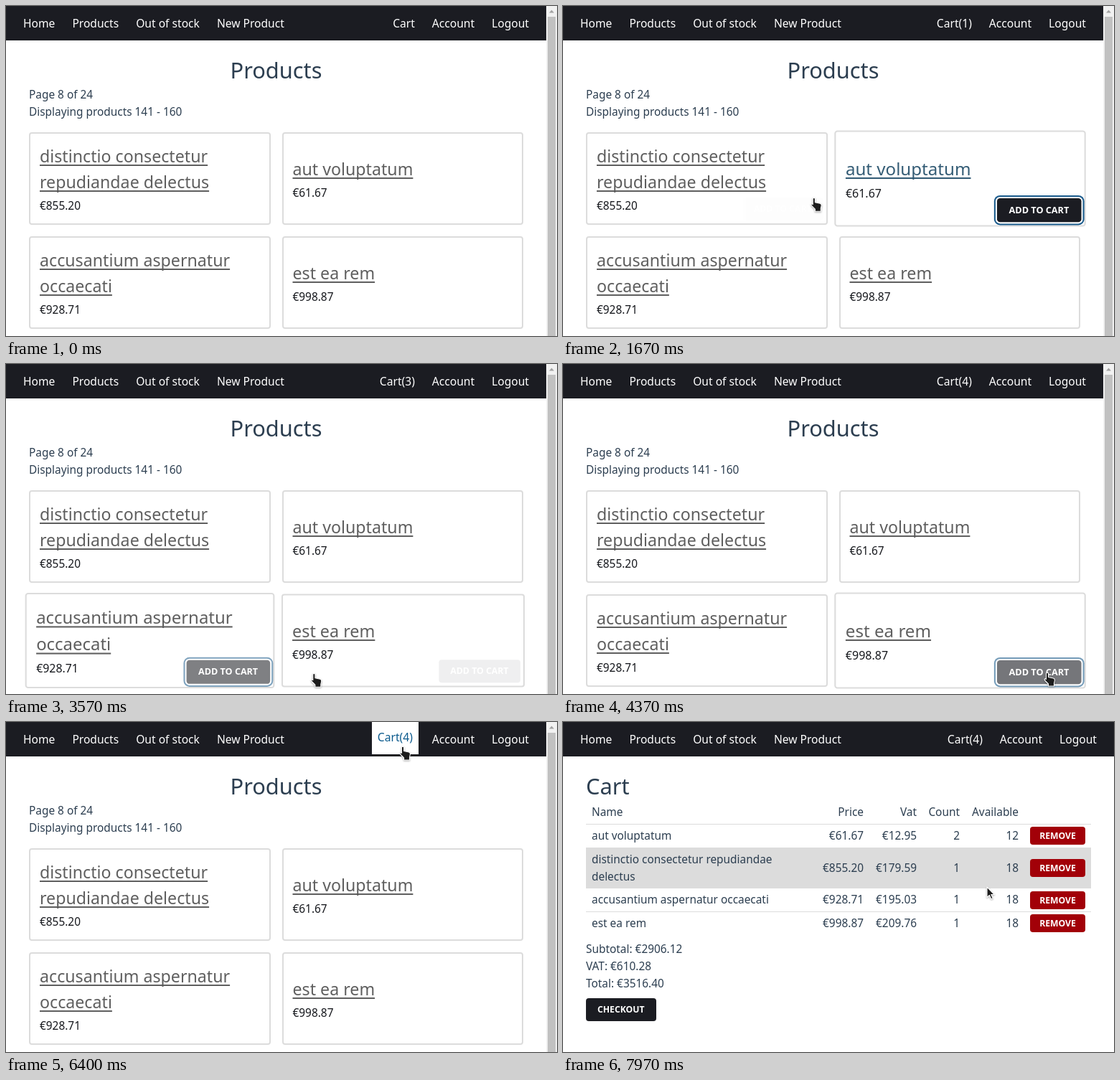
Write an HTML page that moves like this. It is 768 by 460 pixels and loops after 8000 ms.

```html
<!DOCTYPE html>
<html lang="en">
<head>
<meta charset="utf-8">
<title>Shop</title>
<style>
  html, body { margin: 0; width: 100%; height: 100%; overflow: hidden; background: #fff; }
  * { box-sizing: border-box; }
  #stage {
    position: relative; width: 768px; height: 460px; overflow: hidden; background: #fff;
    font: 15.4px/24px "Noto Sans", "Open Sans", sans-serif; color: #2c3e50;
  }
  .page { position: absolute; inset: 0; }
  .page > *, #nav, #bar, #thumb, #cursor { position: absolute; }
  .text, .title, .link, .row span { white-space: pre; }
  .text { left: 32px; }

  #nav { left: 0; top: 0; width: 100%; height: 48px; background: #1b1c22; }
  #links { height: 48px; padding: 0 16px; display: flex; gap: 8px; }
  .link { padding: 0 8px; font-size: 15.6px; line-height: 48px; color: #fff; }
  #cart { margin-left: auto; }

  h1 { top: 65px; left: 32px; margin: 0; font-size: 30.8px; font-weight: 400; line-height: 48px; }
  #shop h1 { left: 0; width: 753px; text-align: center; }
  #cards {
    left: 32px; top: 176px; width: 689px;
    display: grid; grid-template-columns: 1fr 1fr; grid-auto-rows: 129px; gap: 16px;
  }
  .card {
    position: relative; padding-left: 13px; border: 2px solid #dcdcdc; border-radius: 4px;
    display: flex; flex-direction: column; justify-content: center; align-items: flex-start;
  }
  .title {
    font-size: 23.2px; line-height: 36px; color: #5f5f5f;
    text-decoration: underline 1.5px; text-underline-offset: 3px; text-decoration-skip-ink: none;
  }
  .price { margin-top: 4px; color: #16181d; }
  .button {
    height: 32px; padding: 0 16px; border-radius: 4px; background: #1b1c22; color: #fff;
    font-size: 12.2px; font-weight: 700; line-height: 32px;
  }
  .card .button { position: absolute; right: 4px; bottom: 4px; }

  #rows { left: 32px; top: 110.3px; width: 704px; }
  .row {
    display: grid; grid-template-columns: 300px 1fr 74px 60px 82px 93px; align-items: center;
    padding: 3.85px 8px; border-bottom: 1px solid #dcdcdc; text-align: right;
  }
  .row:last-child { border-color: transparent; }
  .row span:first-child { text-align: left; }
  .row .button {
    justify-self: end; width: 77px; height: 25px; margin: -1px 0; padding: 0;
    text-align: center; line-height: 25px; background: #a20008;
  }

  #bar { left: 753px; top: 0; width: 15px; height: 460px; background: #f1f1f1; }
  #bar svg { display: block; }
  #thumb { left: 2px; top: 15px; width: 11px; height: 445px; }
  #cursor { left: 0; top: 0; filter: drop-shadow(0 1px 1px #0005); overflow: visible; }
</style>
</head>
<body>
<div id="stage">
  <div id="shop" class="page">
    <h1>Products</h1>
    <div class="text" style="top:112px">Page 8 of 24
Displaying products 141 - 160</div>
    <div id="cards"></div>
  </div>
  <div id="basket" class="page">
    <h1>Cart</h1>
    <div id="rows"></div>
    <div class="text" style="top:305px">Subtotal: €2906.12
VAT: €610.28
Total: €3516.40</div>
    <span class="button" style="left:32px;top:385px">CHECKOUT</span>
  </div>
  <div id="nav">
    <div id="links">
      <span class="link">Home</span>
      <span class="link">Products</span>
      <span class="link">Out of stock</span>
      <span class="link">New Product</span>
      <span class="link" id="cart">Cart</span>
      <span class="link">Account</span>
      <span class="link">Logout</span>
    </div>
  </div>
  <div id="bar">
    <svg width="15" height="15"><path d="M4 9.5 7.5 5.5 11 9.5z" fill="#a3a3a3"/></svg>
    <div id="thumb"></div>
  </div>
  <svg id="cursor" width="20" height="24" fill="#1c1c1c" stroke="#fff" stroke-width="1.1" stroke-linejoin="round">
    <path id="hand" d="M-1.6 1Q0-.8 1.6 1V6.5L8.5 8Q10.6 8.6 10.4 11L9.5 15V19H1.5V16L-3.4 11Q-4.6 9 -2.8 8.6L-1.6 9.4Z"/>
    <path id="arrow" d="M0 0V14.5L3.4 11.4 5.8 16.8 8.2 15.7 5.8 10.5H10.3Z"/>
  </svg>
</div>
<script>
const LOOP = 8000, LAG = 20, SWITCH = 6520;
const BLUE = [11, 90, 141];
const $ = id => document.getElementById(id);
const clamp = v => Math.max(0, Math.min(1, v));
const smooth = k => k * k * (3 - 2 * k);
const lerp = (a, b, k) => a + (b - a) * k;
const mix = (a, b, k) => `rgb(${a.map((v, i) => Math.round(lerp(v, b[i], k)))})`;

function add(parent, tag, className, text = '') {
  const el = document.createElement(tag);
  el.className = className;
  el.textContent = text;
  return parent.appendChild(el);
}

// Pointer glides between resting places.
const glides = [
  { from: 30, to: 620, x: 270, y: 400 },
  { from: 700, to: 1000, x: 638, y: 284 },
  { from: 1080, to: 1250, x: 520, y: 240 },
  { from: 1481, to: 1761, x: 295, y: 276 },
  { from: 2370, to: 2670, x: 281, y: 432 },
  { from: 3300, to: 3950, x: 675, y: 430 },
  { from: 4400, to: 4740, x: 656, y: 279 },
  { from: 5350, to: 6250, x: 553, y: 34 },
  { from: 7520, to: 7900, x: 591, y: 230 }
];
const clicks = [
  { at: 1040, card: 1 }, { at: 2130, card: 0 }, { at: 2950, card: 2 },
  { at: 4190, card: 3 }, { at: 5060, card: 1 }
];

function pointer(t) {
  return glides.reduce(([x, y], g) => {
    const k = smooth(clamp((t - g.from) / (g.to - g.from)));
    return [lerp(x, g.x, k), lerp(y, g.y, k)];
  }, [790, 350]);
}

function box(el, pad = 0) {
  const r = el.getBoundingClientRect();
  return { left: r.left - pad, top: r.top - pad, right: r.right + pad, bottom: r.bottom + pad };
}

function inside(t, b) {
  const [x, y] = pointer(t);
  return x >= b.left && x < b.right && y >= b.top && y < b.bottom;
}

// Linear transition towards a target that depends on time; returns value(t).
function transition(target, duration) {
  const steps = [{ t: -duration, from: 0, to: 0 }];
  const value = t => {
    const s = steps.findLast(s => s.t <= t);
    return lerp(s.from, s.to, clamp((t - s.t) / duration));
  };
  for (let t = 0; t < LOOP; t += 10) {
    const to = Number(target(t - LAG));
    if (to !== steps.at(-1).to) steps.push({ t, from: value(t), to });
  }
  return value;
}
const hover = (area, duration, since = 0) =>
  transition(t => t >= since && inside(t, area), duration);

const cards = [
  ['distinctio consectetur\nrepudiandae delectus', '€855.20'],
  ['aut voluptatum', '€61.67'],
  ['accusantium aspernatur\noccaecati', '€928.71'],
  ['est ea rem', '€998.87']
].map(([name, price]) => {
  const el = add($('cards'), 'div', 'card');
  const title = add(el, 'span', 'title', name);
  add(el, 'span', 'price', price);
  return { el, title, button: add(el, 'span', 'button', 'ADD TO CART') };
});
for (const c of cards) {
  const buttonArea = box(c.button);
  c.area = box(c.el, 5);
  c.grow = hover(c.area, 200);
  c.tint = hover(box(c.title), 200);
  c.show = transition(t => inside(t, c.area) && (inside(t, buttonArea) ? 0.6 : 1), 500);
}

const rows = [
  ['Name', 'Price', 'Vat', 'Count', 'Available'],
  ['aut voluptatum', '€61.67', '€12.95', 2, 12],
  ['distinctio consectetur repudiandae\ndelectus', '€855.20', '€179.59', 1, 18],
  ['accusantium aspernatur occaecati', '€928.71', '€195.03', 1, 18],
  ['est ea rem', '€998.87', '€209.76', 1, 18]
].map((cells, i) => {
  const el = add($('rows'), 'div', 'row');
  cells.forEach(cell => add(el, 'span', '', cell));
  if (i) add(el, 'span', 'button', 'REMOVE');
  return { el, glow: i ? hover(box(el), 80, SWITCH) : () => 0 };
});

const cartArea = { left: 509, top: 0, right: 593, bottom: 48 };
const cartHover = hover(cartArea, 200);
const thumbHover = hover(box($('thumb'), 2), 30);

function render(t) {
  const shopping = t < SWITCH;
  $('shop').style.display = $('bar').style.display = shopping ? '' : 'none';
  $('basket').style.display = shopping ? 'none' : '';
  $('links').style.width = shopping ? '753px' : '768px';

  const focus = clicks.findLast(c => c.at <= t)?.card;
  cards.forEach((c, i) => {
    c.el.style.transform = `scale(${1 + 0.04 * c.grow(t)})`;
    c.title.style.color = mix([95, 95, 95], BLUE, c.tint(t));
    c.button.style.opacity = c.show(t);
    c.button.style.boxShadow = i === focus ? '0 0 0 2px #fff, 0 0 0 4px #1a5b8c' : 'none';
  });
  rows.forEach(r => r.el.style.backgroundColor = `rgba(220,220,220,${r.glow(t)})`);

  const added = new Set(clicks.filter(c => c.at + 60 <= t).map(c => c.card)).size;
  const k = cartHover(t), cart = $('cart');
  cart.textContent = added ? `Cart(${added})` : 'Cart';
  cart.style.transform = `translate(${-3 * k}px,${-3 * k}px)`;
  cart.style.backgroundColor = `rgba(255,255,255,${k})`;
  cart.style.color = mix([255, 255, 255], BLUE, k);
  $('thumb').style.backgroundColor = mix([193, 193, 193], [168, 168, 168], thumbHover(t));

  const [x, y] = pointer(t);
  const pointing = inside(t, cartArea) || shopping && cards.some(c => inside(t, c.area));
  $('cursor').style.transform = `translate(${x}px,${y}px)`;
  $('hand').style.display = pointing ? '' : 'none';
  $('arrow').style.display = pointing ? 'none' : '';
}

const start = performance.now();
function frame() {
  render((performance.now() - start) % LOOP);
  requestAnimationFrame(frame);
}
frame();
</script>
</body>
</html>
```
